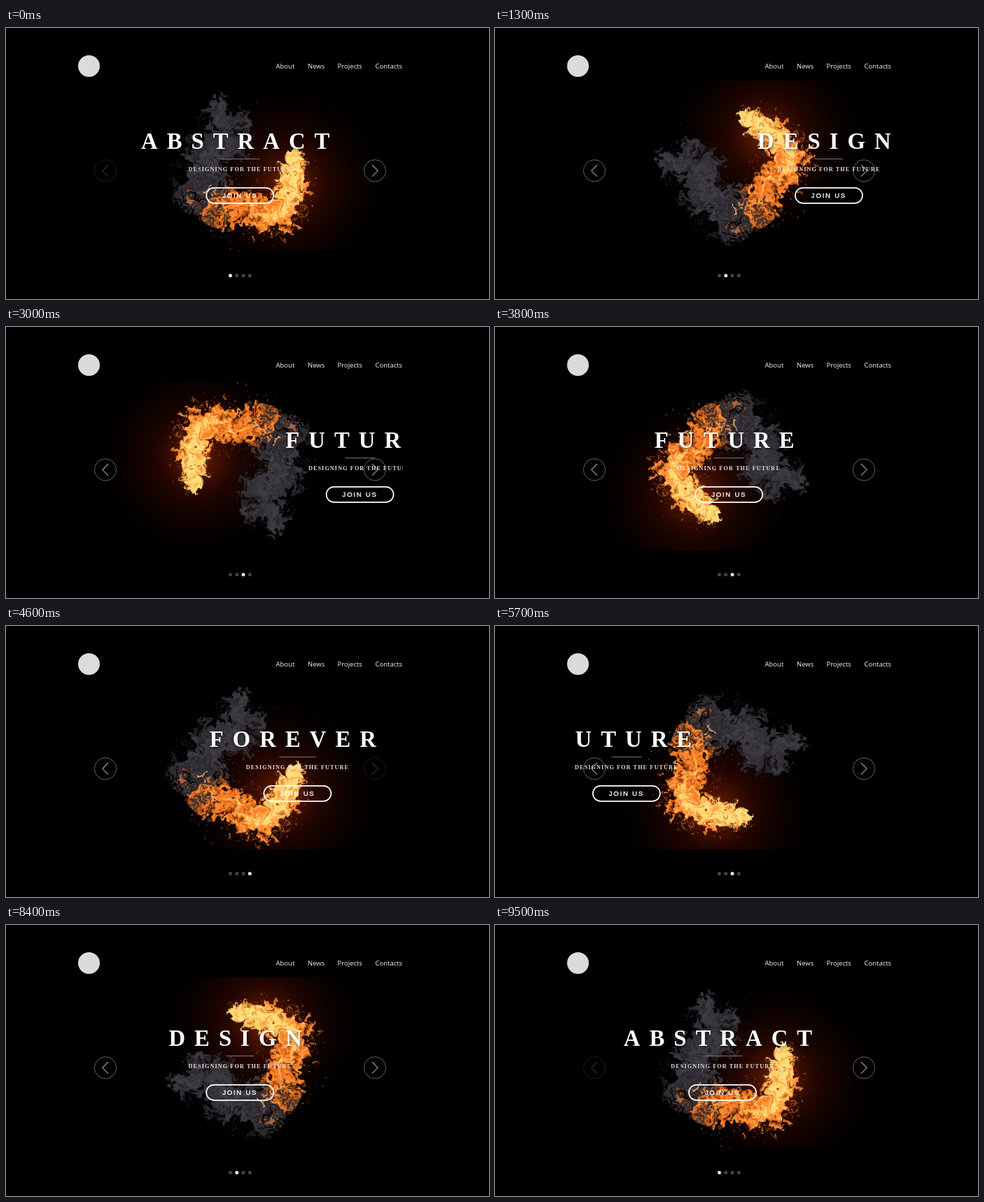
Recreate the animation shown at these times as an HTML page with a canvas. Size 690 by 388 pixels, loop 9600 ms.

```html
<!DOCTYPE html>
<html lang="en">
<head>
<meta charset="utf-8">
<title>Fire slider</title>
<style>
  html, body { margin: 0; width: 100%; height: 100%; overflow: hidden; background: #000; }
  canvas, svg { position: absolute; left: 0; top: 0; width: 690px; height: 388px; }
  text { fill: #fff; font-kerning: none; }
  .nav { font: 9.5px "Open Sans", sans-serif; fill: #f4f4f4; }
  .title { font: bold 32.7px "Liberation Serif", serif; letter-spacing: 13.05px;
    filter: drop-shadow(1px 2px 2px rgba(0, 0, 0, .55)); }
  .sub { font: bold 8.2px "Liberation Serif", serif; letter-spacing: 1.1px; fill: #dedede; }
  .join { font: 9.6px "Liberation Sans", sans-serif; letter-spacing: 1.75px; stroke: #fff; stroke-width: .35px; }
  .mid { text-anchor: middle; }
</style>
</head>
<body>
<canvas id="stage" width="690" height="388"></canvas>
<svg id="ui" viewBox="0 0 690 388">
  <defs><clipPath id="slot"><rect x="102" y="130" width="465" height="140"/></clipPath></defs>
  <circle cx="118.5" cy="54.5" r="15.5" fill="#d9dbdc"/>
</svg>
<script>
const start = performance.now();
const LOOP = 9600, STEP = 100, PITCH = 540, MID = 334.2, MOVE = 1300;
const words = ['ABSTRACT', 'DESIGN', 'FUTURE', 'FOREVER'];
const rules = [57, 40, 43, 52];
const turns = [0, -84, -235, -360];
// start time, slide left, slide entered
const moves = [[728, 0, 1], [2480, 1, 2], [3885, 2, 3], [5135, 3, 2], [6585, 2, 1], [8420, 1, 0]];

const clamp = (v, a = 0, b = 1) => Math.min(b, Math.max(a, v));
const mix = (a, b, k) => a + (b - a) * k;
const smooth = (a, b, v) => { const k = clamp((v - a) / (b - a)); return k * k * (3 - 2 * k); };

// cubic-bezier(.25, .1, .25, 1)
function ease(x) {
  if (x <= 0) return 0;
  if (x >= 1) return 1;
  const curve = (s, a, b) => 3 * (1 - s) * (1 - s) * s * a + 3 * (1 - s) * s * s * b + s * s * s;
  let lo = 0, hi = 1;
  for (let i = 0; i < 24; i++) {
    const m = (lo + hi) / 2;
    if (curve(m, .25, .25) < x) lo = m; else hi = m;
  }
  return curve(lo, .1, 1);
}

/* ---------- fire and smoke ---------- */
const HALF = 130, SCALE = 1.5, SIZE = HALF * 2 * SCALE;
// x, y, half width
const spine = [
  [-35, -84, 18], [-24, -52, 36], [-50, -18, 39], [-60, 26, 38], [-35, 58, 33],
  [8, 62, 34], [54, 66, 33], [70, 32, 29], [72, -14, 14]
];

function along(q) {
  const f = clamp(q) * (spine.length - 1), i = Math.min(spine.length - 2, Math.floor(f));
  return spine[i].map((v, n) => mix(v, spine[i + 1][n], f - i));
}
const samples = Array.from({ length: 57 }, (_, i) => along(i / 56));

function hash(x, y) {
  const s = Math.sin(x * 127.1 + y * 311.7) * 43758.5453;
  return s - Math.floor(s);
}
function noise(x, y) {
  const i = Math.floor(x), j = Math.floor(y);
  const u = smooth(0, 1, x - i), v = smooth(0, 1, y - j);
  return mix(mix(hash(i, j), hash(i + 1, j), u), mix(hash(i, j + 1), hash(i + 1, j + 1), u), v);
}
const fbm = (x, y) => noise(x, y) * .5 + noise(x * 2.1 + 9, y * 2.1) * .28 + noise(x * 4.3, y * 4.3 + 5) * .22;

function nearest(x, y) {
  let best = 1e9, at = 0;
  samples.forEach(([sx, sy], i) => {
    const d = (x - sx) * (x - sx) + (y - sy) * (y - sy);
    if (d < best) { best = d; at = i; }
  });
  return [Math.sqrt(best), at];
}

function fireColor(heat) {
  return [255 * clamp(heat * 1.65), 222 * heat ** 1.15, 125 * heat ** 2.3];
}
function smokeColor(l) {
  return [l, l * .95, l * 1.09];
}

function buildFlame() {
  const cv = document.createElement('canvas');
  cv.width = cv.height = SIZE;
  const g = cv.getContext('2d'), img = g.createImageData(SIZE, SIZE);
  for (let py = 0; py < SIZE; py++) {
    for (let px = 0; px < SIZE; px++) {
      const x = px / SCALE - HALF, y = py / SCALE - HALF;
      if (nearest(x, y)[0] > 66) continue;
      const wx = x + (fbm(x / 17 + 40, y / 17) - .5) * 34;
      const wy = y + (fbm(x / 17, y / 17 + 70) - .5) * 34;
      const [dist, at] = nearest(wx, wy);
      const body = 1 - dist / samples[at][2] + (fbm(wx / 8, wy / 8) - .5) * 1.6;
      const alpha = smooth(.06, .32, body);
      if (!alpha) continue;
      const vein = clamp((1 - Math.abs(2 * fbm(wx / 12 + 20, wy / 12) - 1)) * 1.5 - .6);
      const grain = fbm(wx / 5, wy / 5 + 30);
      const q = at / 56;
      const burn = smooth(.41, .56, q + (grain - .5) * .4);
      const heat = clamp(.42 + body * .34 + (grain - .5) * .95 + (q - .65) * 1.1);
      const hot = fireColor(heat);
      const cold = smokeColor(32 + 28 * vein + 50 * clamp(grain - .3) * clamp(body + .4));
      const o = (py * SIZE + px) * 4;
      for (let c = 0; c < 3; c++) img.data[o + c] = mix(cold[c], hot[c], burn);
      img.data[o + 3] = 255 * alpha * mix(.88, 1, burn);
    }
  }
  g.putImageData(img, 0, 0);

  // loose sparks and ash
  g.setTransform(SCALE, 0, 0, SCALE, SIZE / 2, SIZE / 2);
  let seed = 7;
  const rnd = () => (seed = seed * 16807 % 2147483647) / 2147483647;
  for (let i = 0; i < 420; i++) {
    const q = rnd(), [x, y, w] = along(q);
    const a = rnd() * Math.PI * 2, d = w * (.75 + rnd() * rnd() * 1.1);
    const c = q > .46 ? fireColor(.35 + rnd() * .4) : smokeColor(34 + rnd() * 30);
    g.fillStyle = `rgba(${c.map(Math.round)},${.35 + rnd() * .5})`;
    g.beginPath();
    g.ellipse(x + Math.cos(a) * d, y + Math.sin(a) * d, .4 + rnd() * 1.1, .3 + rnd() * .5, a, 0, 7);
    g.fill();
  }
  return cv;
}

const flame = buildFlame();
const ctx = document.getElementById('stage').getContext('2d');
const glow = ctx.createRadialGradient(64, 22, 10, 64, 22, 140);
glow.addColorStop(0, 'rgba(120,32,3,.8)');
glow.addColorStop(.35, 'rgba(58,10,1,.6)');
glow.addColorStop(.65, 'rgba(28,4,1,.45)');
glow.addColorStop(1, 'rgba(8,1,0,0)');

function drawFlame(deg) {
  ctx.clearRect(0, 0, 690, 388);
  ctx.save();
  ctx.beginPath();
  ctx.rect(102, 75, 465, 245);
  ctx.clip();
  ctx.translate(339, 200);
  ctx.rotate(deg * Math.PI / 180);
  ctx.fillStyle = glow;
  ctx.fillRect(-260, -260, 520, 520);
  ctx.drawImage(flame, -HALF, -HALF, HALF * 2, HALF * 2);
  ctx.restore();
}

/* ---------- interface ---------- */
const ui = document.getElementById('ui');
function add(parent, tag, attrs, label) {
  const el = document.createElementNS('http://www.w3.org/2000/svg', tag);
  for (const k in attrs) el.setAttribute(k, attrs[k]);
  if (label) el.textContent = label;
  parent.appendChild(el);
  return el;
}

[['About', 385.5], ['News', 431], ['Projects', 473.5], ['Contacts', 527.5]]
  .forEach(([label, x]) => add(ui, 'text', { class: 'nav', x, y: 58.3 }, label));

const arrows = [[142, -1], [527, 1]].map(([x, dir]) => {
  const g = add(ui, 'g', { transform: `translate(${x} 204.3) scale(${dir} 1)`, fill: 'none' });
  add(g, 'circle', { r: 15.6, stroke: '#626262' });
  add(g, 'path', { d: 'M-4 -8.3L4.2 0L-4 8.3', stroke: '#a0a0a0', 'stroke-width': 1.1 });
  return g;
});

const dots = words.map((_, i) => add(ui, 'circle', { cx: 320.5 + i * 9.27, cy: 354.5, r: 2.5 }));

const view = add(ui, 'g', { 'clip-path': 'url(#slot)' });
const slides = words.map((word, i) => {
  const g = add(view, 'g', {});
  add(g, 'text', { class: 'title mid', x: 0, y: 173 }, word);
  add(g, 'rect', { x: -rules[i] / 2, y: 187, width: rules[i], height: 1, fill: '#777' });
  add(g, 'text', { class: 'sub mid', x: 0, y: 205 }, 'DESIGNING FOR THE FUTURE');
  add(g, 'rect', {
    x: -48, y: 228.8, width: 96, height: 22, rx: 11,
    fill: 'none', stroke: '#fff', 'stroke-width': 1.7
  });
  add(g, 'text', { class: 'join mid', x: 0, y: 243.3 }, 'JOIN US');
  return g;
});

function render(ms) {
  const t = Math.floor(ms % LOOP / STEP) * STEP;
  let from = 0, to = 0, p = 1;
  for (const [at, a, b] of moves) {
    if (t >= at) { from = a; to = b; p = ease((t - at) / MOVE); }
  }
  const pos = mix(from, to, p);
  const active = p > .1 ? to : from;
  drawFlame(mix(turns[from], turns[to], p));
  slides.forEach((g, i) => {
    const seen = i === to ? 1 : i === from ? clamp((.27 - p) / .15) : 0;
    g.setAttribute('transform', `translate(${MID + (i - pos) * PITCH} 0)`);
    g.setAttribute('opacity', seen);
  });
  dots.forEach((d, i) => d.setAttribute('fill', i === active ? '#e8e8e8' : '#454545'));
  arrows[0].setAttribute('opacity', active === 0 ? .3 : 1);
  arrows[1].setAttribute('opacity', active === 3 ? .3 : 1);
}

function tick() {
  render(Math.max(0, performance.now() - start));
  requestAnimationFrame(tick);
}
tick();
</script>
</body>
</html>
```
